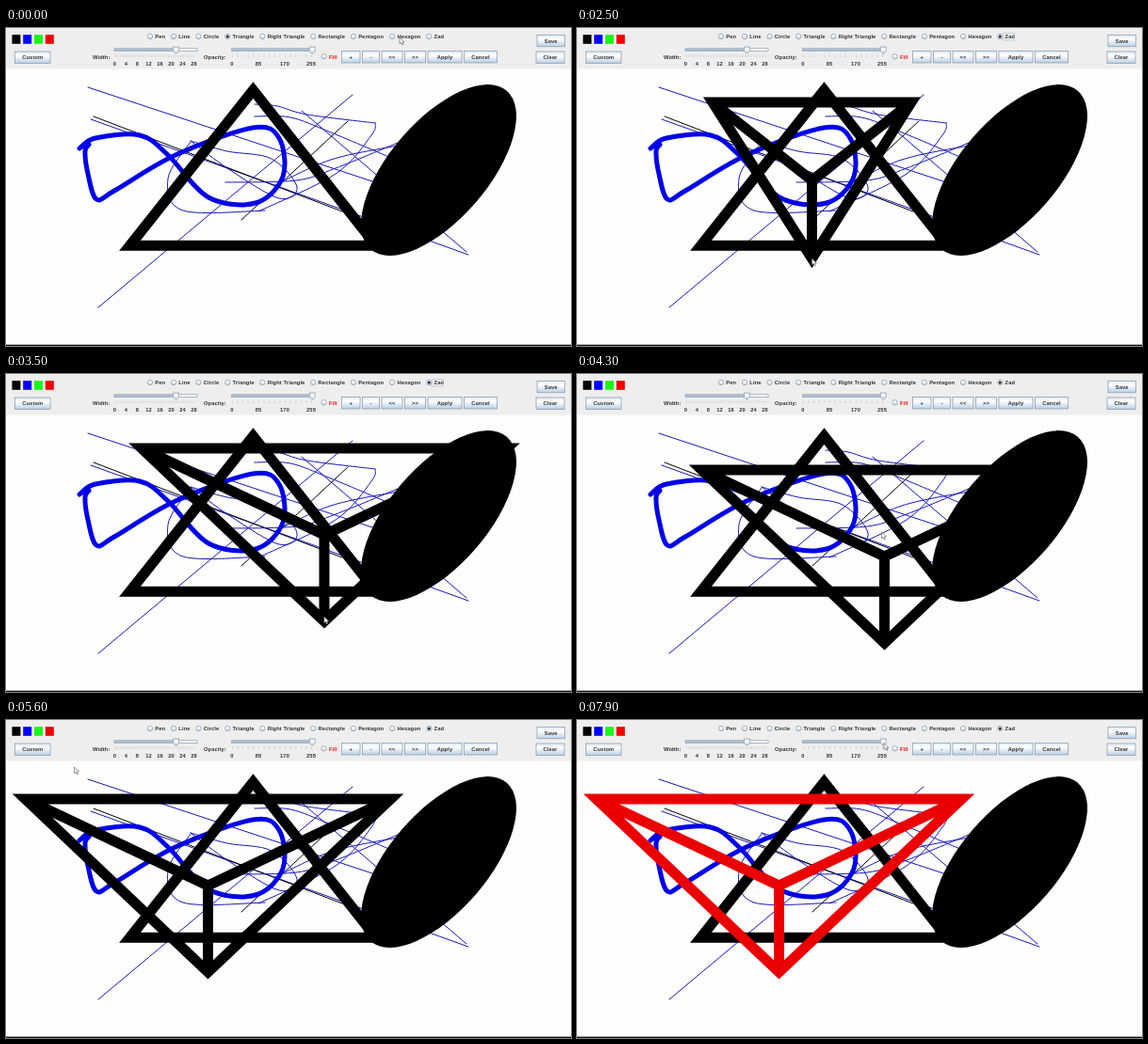
These frames come from a looping animation (600x338 px, 8000 ms). An HTML page:

```html
<!DOCTYPE html>
<html lang="en">
<head>
<meta charset="utf-8">
<title>Paint window</title>
<style>
  html, body { margin: 0; width: 100%; height: 100%; overflow: hidden; background: #fff; }
  svg { display: block; width: 600px; height: 338px; }
  text { font: bold 5.75px "Liberation Sans", Arial, sans-serif; letter-spacing: .1px; fill: #333; }
  .pen { fill: none; stroke: #1616bc; stroke-width: 1; stroke-linejoin: round; stroke-linecap: round; }
  .thick { stroke: #0000e8; stroke-width: 5; }
  .black { stroke: #000; }
  .solid { fill: none; stroke: #000; stroke-width: 11; stroke-miterlimit: 10; }
  .edge { fill: url(#metal); stroke: #8797a8; stroke-width: .7; }
</style>
</head>
<body>
<svg id="stage" viewBox="0 0 600 338">
  <defs>
    <linearGradient id="metal" x2="0" y2="1">
      <stop offset="0" stop-color="#dde8f3"/>
      <stop offset=".35" stop-color="#fff"/>
      <stop offset="1" stop-color="#b8cfe5"/>
    </linearGradient>
  </defs>
  <rect width="600" height="338" fill="#fefefe"/>
  <g id="art"></g>
  <path id="zad" class="solid"/>
  <rect width="600" height="43.5" fill="#eee"/>
  <rect y="336.6" width="600" height="1.4" fill="#111"/>
  <g id="bar"></g>
  <path id="cursor" d="M0 0V6.8L1.6 5.4L2.8 8L3.9 7.5L2.8 5H5Z" fill="#fff" stroke="#555" stroke-width=".6"/>
</svg>
<script>
const $ = id => document.getElementById(id);

function add(parent, tag, attrs, text) {
  const el = document.createElementNS("http://www.w3.org/2000/svg", tag);
  for (const k in attrs) el.setAttribute(k, attrs[k]);
  if (text) el.textContent = text;
  return $(parent).appendChild(el);
}

// Smooth curve through points given as "x,y x,y ..."
function spline(list) {
  const p = list.split(" ").map(s => s.split(",").map(Number));
  let d = "M" + p[0];
  for (let i = 0; i < p.length - 1; i++) {
    const a = p[i - 1] || p[i], b = p[i], c = p[i + 1], e = p[i + 2] || c;
    const c1 = b.map((v, k) => v + (c[k] - a[k]) / 6);
    const c2 = c.map((v, k) => v - (e[k] - b[k]) / 6);
    d += `C${c1} ${c2} ${c}`;
  }
  return d;
}

// Drawing
const stroke = (d, cls = "") => add("art", "path", { d, class: "pen " + cls });
stroke("M87 63L395 165M90 97L491 241M368 71L98 297M314 88L489 238");
stroke("M93 94L357 195M363 99L250 204", "black");
stroke(spline("264,81 288,83 320,92 392,101"));
stroke(spline("392,101 388,114 350,155 268,195"));
stroke(spline("264,94 302,95 345,111 416,141"));
stroke(spline("233,164 308,162 350,149 416,122"));
stroke(spline("416,125 345,140 284,168"));
stroke(spline("196,120 235,131 282,139 309,169 290,181 238,151 196,120"));
stroke(spline("196,121 172,160 188,194 275,194"));
stroke(spline("78,128 95,117 142,114 172,135 215,180 265,186 294,158 290,117 262,106 180,135 115,173 96,182 87,155 84,131 88,124"), "thick");
add("art", "path", { d: "M262.5 66L131.5 231.3H393Z", class: "solid" });
add("art", "ellipse", { rx: 111, ry: 52.3, transform: "translate(459.5 151) rotate(-49.4)" });

// Toolbar
const label = (x, y, text, extra) => add("bar", "text", { x, y, ...extra }, text);
const mid = { "text-anchor": "middle" };

["#000", "#00f", "#1cf51c", "#f00000"].forEach((fill, i) =>
  add("bar", "rect", { x: 6.4 + i * 11.8, y: 7.2, width: 9, height: 9.6, fill }));

function radio(cx, cy) {
  add("bar", "circle", { cx, cy, r: 2.7, class: "edge" });
  return add("bar", "circle", { cx, cy, r: 1.5, fill: "#222", visibility: "hidden" });
}

const dots = {};
let next = 153;
for (const name of ["Pen", "Line", "Circle", "Triangle", "Right Triangle", "Rectangle", "Pentagon", "Hexagon", "Zad"]) {
  dots[name] = radio(next, 9);
  next += 5.3 + label(next + 5.3, 11.3, name).getComputedTextLength() + 8.9;
}
const focusBox = add("bar", "rect", { x: 452, y: 5.5, width: 12.5, height: 7.5, fill: "none", stroke: "#a9bdd3", "stroke-width": .6 });
radio(337.5, 30.3);
label(343, 32.8, "Fill", { style: "fill:#e81010" });

function slider(name, nameX, x, thumb, step, count, ticks) {
  const width = 88, span = 84;
  label(nameX, 32.8, name);
  add("bar", "rect", { x, y: 21.8, width, height: 2.8, fill: "#fff", stroke: "#7a8a99", "stroke-width": .6 });
  add("bar", "rect", { x, y: 22.2, width: thumb - x, height: 2, fill: "#a3b8cc" });
  for (let i = 0; i <= ticks; i++)
    add("bar", "path", { d: `M${x + 1 + i * span / ticks} 28.5v2.4`, stroke: "#a5afb9", "stroke-width": .5 });
  for (let i = 0; i <= count; i++)
    label(x + .5 + i * span / count, 39.8, String(i * step), mid);
  add("bar", "path", { d: `M${thumb - 3} 20h6v4.6l-3 2.8l-3-2.8Z`, class: "edge" });
}
slider("Width:", 92, 115, 180.5, 4, 7, 28);
slider("Opacity:", 210, 239.5, 325.3, 85, 3, 15);

function button(name, x, y, width) {
  add("bar", "rect", { x, y, width, height: 12.5, class: "edge" });
  label(x + width / 2, y + 8.4, name, mid);
  return x + width + 2.5;
}
button("Custom", 9.5, 25, 37.5);
button("Save", 564, 7.3, 29.5);
button("Clear", 563, 25, 30);
let x = 356.5;
for (const [name, width] of [["+", 19.5], ["-", 18], ["<<", 22], [">>", 22], ["Apply", 36], ["Cancel", 35]])
  x = button(name, x, 24.5, width);

// Pointer stops: time, x, y; it eases from one to the next
const stops = [
  [100, 450, 9], [600, 450, 9], [1400, 142.5, 85], [1600, 144, 79], [2200, 266, 262], [2500, 249.5, 245],
  [3000, 332, 296], [3400, 338, 263], [4200, 335, 145], [4300, 323.5, 168], [5100, 211.5, 150],
  [5600, 72.5, 50], [6100, 46, 12], [6300, 46, 12], [6950, 118, 151], [7600, 333, 27], [7900, 326, 24.5]
];
const LOOP = 8000, STEP = 100, SELECT = 300, PRESS = 1600, DROP = 3400, BLUR = 3800;
const GRAB = 4200, RELEASE = 5100, RECOLOR = 6200;
const anchor = [144, 79];

function pointer(t) {
  if (t < stops[0][0]) return [418, 10];
  const i = stops.findIndex(s => s[0] > t);
  if (i < 0) return stops[stops.length - 1].slice(1);
  const [t0, x0, y0] = stops[i - 1], [t1, x1, y1] = stops[i];
  const u = (t - t0) / (t1 - t0), e = u * u * (3 - 2 * u);
  return [x0 + (x1 - x0) * e, y0 + (y1 - y0) * e];
}

function zadPath(t) {
  if (t <= PRESS) return "";
  const [cx, cy] = pointer(Math.min(t, DROP));
  const [gx, gy] = pointer(GRAB);
  const [px, py] = pointer(Math.min(Math.max(t, GRAB), RELEASE));
  const dx = px - gx, dy = py - gy;
  const left = anchor[0] + dx, top = anchor[1] + dy, x = cx + dx, bottom = cy + dy;
  const right = 2 * x - left, hub = `M${x} ${(top + bottom) / 2}L`;
  return `M${left} ${top}H${right}L${x} ${bottom}Z${hub}${left} ${top}${hub}${right} ${top}${hub}${x} ${bottom}`;
}

const show = (el, on) => el.setAttribute("visibility", on ? "visible" : "hidden");

function render(t) {
  $("cursor").setAttribute("transform", `translate(${pointer(t)})`);
  $("zad").setAttribute("d", zadPath(t));
  $("zad").style.stroke = t < RECOLOR ? "#000" : "#ea0000";
  show(dots.Triangle, t < SELECT);
  show(dots.Zad, t >= SELECT);
  show(focusBox, t >= SELECT && t < BLUR);
}

const start = performance.now();
function tick() {
  const t = (performance.now() - start) % LOOP;
  render(Math.floor(t / STEP) * STEP);
  requestAnimationFrame(tick);
}
tick();
</script>
</body>
</html>
```
